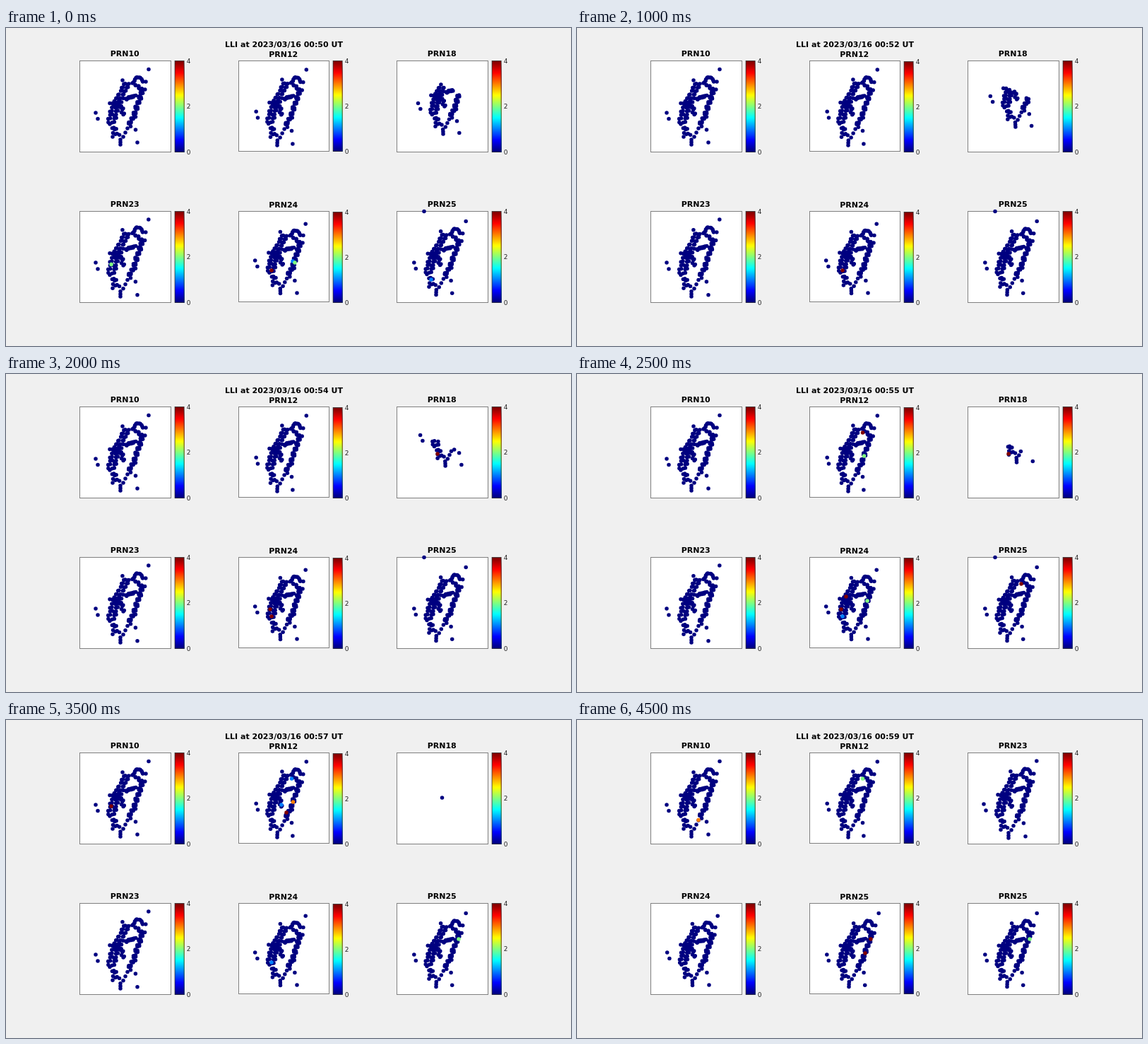
An HTML page for the animation above (5 s loop, 800 px wide and 450 px high).

```html
<!DOCTYPE html>
<html lang="en">
<head>
<meta charset="utf-8">
<title>LLI maps</title>
<style>
  html, body { margin: 0; width: 100%; height: 100%; overflow: hidden; background: #f0f0f0; }
  svg { display: block; width: 800px; height: 450px; }
  text { font-family: "DejaVu Sans", sans-serif; }
  .head { font-size: 11px; font-weight: bold; text-anchor: middle; }
  .tick { font-size: 9px; fill: #262626; }
  .box { fill: #fff; stroke: #808080; }
  .frame { fill: none; stroke: #333; stroke-width: .8; }
</style>
</head>
<body>
<svg id="stage" viewBox="0 0 800 450"></svg>
<script>
const STEP = 500, COUNT = 10, SHADES = 64;
const stage = document.getElementById('stage');

// Jet colour scale, 0 to 1.
function jet(value) {
  const channel = peak => 255 * Math.max(0, Math.min(1, 1.5 - Math.abs(4 * value - peak)));
  return `rgb(${[3, 2, 1].map(channel).map(Math.round)})`;
}

// Stations spaced along a polyline, scattered evenly across its width.
function band(count, width, ...line) {
  const last = line.length - 1;
  const scatter = [i => (i * .618 % 1 - .5) * width, i => (i * .755 % 1 - .5) * width / 2];
  return Array.from({ length: count }, (_, i) => {
    const at = i / (count - 1) * last, k = Math.min(last - 1, Math.floor(at));
    return scatter.map((shift, d) =>
      line[k][d] + (line[k + 1][d] - line[k][d]) * (at - k) + shift(i));
  });
}

const northEast = [98, 12.5], west = [23, 74], south = [58, 118];
const stations = [
  northEast, west, [26, 82.5], [94, 30], [79.5, 98], [82, 116], [47, 108],
  ...band(11, 1, [77, 31], [80, 24], [86, 24], [90, 30]),
  ...band(9, 4, [77, 33], [91, 42]),
  ...band(34, 12, [67, 31], [62, 44], [53, 58], [51, 63]),
  ...band(12, 6, [65, 55], [78, 50]),
  ...band(20, 14, [50, 64], [46, 88]),
  ...band(9, 8, [47, 92], [53, 107]),
  ...band(8, 5, [58, 62], [63, 77]),
  ...band(30, 6, [89, 42], [84, 58], [78, 76], [70, 92]),
  ...band(3, 0, [68, 96], [62, 108]),
  ...band(3, 0, [58, 112], [58, 119])
];

// Affine map that carries the three outer stations to the given points.
function project(points, [a, b, c]) {
  const ux = northEast[0] - west[0], uy = northEast[1] - west[1];
  const vx = south[0] - west[0], vy = south[1] - west[1];
  const det = ux * vy - uy * vx;
  return points.map(([x, y]) => {
    const dx = x - west[0], dy = y - west[1];
    const s = (dx * vy - dy * vx) / det, t = (dy * ux - dx * uy) / det;
    return [0, 1].map(d => b[d] + (a[d] - b[d]) * s + (c[d] - b[d]) * t);
  });
}

// Where each satellite sees the north-east, west and south stations.
const views = {
  PRN10: [[97.5, 12], [22.5, 73.5], [57.5, 117.5]],
  PRN12: [[95.8, 12.5], [24.7, 71.8], [54.5, 118.5]],
  PRN23: [[97.3, 11.5], [22.5, 72.5], [57.5, 119.5]],
  PRN24: [[94.7, 17.7], [23.2, 69.5], [59, 115]],
  PRN25: [[97.7, 14], [24.3, 72.5], [55.5, 117]]
};
const early = ['PRN10', 'PRN12', 'PRN18', 'PRN23', 'PRN24', 'PRN25'];
const late = ['PRN10', 'PRN12', 'PRN23', 'PRN24', 'PRN25', 'PRN25'];

// Slipping stations: position and level in each minute.
const slips = [
  [149, 122, '.......4'], [172, 141.5, '........23'],
  [406.5, 116, '.2...2.3'], [404.5, 83, '.....4.132'],
  [390, 120, '.......1'], [397, 131, '.......42'],
  [605, 106, '.1'], [611, 113, '...444'],
  [149, 334.5, '21'], [181, 330, '........1'],
  [406, 330, '1'], [409, 332, '2'], [411, 321, '...1.2'],
  [376, 343, '44444111'], [374, 333, '...444'], [381, 315, '.....4'],
  [416, 310, '........44'], [408, 330, '.........4'],
  [602, 356, '1'], [621, 294, '.1'], [607, 312, '...1'],
  [629, 297, '.....4'], [641, 310, '.......222']
];

const dot = ([x, y], level = 0) =>
  `<circle cx="${x.toFixed(1)}" cy="${y.toFixed(1)}" r="2.75" fill="${jet(level / 4)}"/>`;
const label = (kind, x, y, words) => `<text class="${kind}" x="${x}" y="${y}">${words}</text>`;
const rect = (x, y, w, h, look) =>
  `<rect x="${x}" y="${y}" width="${w}" height="${h}" ${look}/>`;

// The setting satellite loses stations from the north-east on.
function setting(minute) {
  if (minute > 6) return [[64, 63.6]];
  const x = 65.5 + 1.05 * minute - .07 * minute ** 2, y = 102.5 - 5 * minute;
  const visible = stations.filter(([a, b]) => b - .4 * a > 19.6 + 10.7 * minute);
  return project(visible, [[x + 33, y - 95], [x - 35.5, y - 42.5], [x, y]]);
}

function colorBar(x, y, height) {
  let parts = '';
  for (let i = 0; i < SHADES; i++) {
    const top = i / SHADES * height;
    parts += rect(x, y + top, 13, height - top, `fill="${jet(1 - i / (SHADES - 1))}"`);
  }
  return parts + rect(x, y, 13, height, 'class="frame"')
    + [4, 2, 0].map((n, i) => label('tick', x + 16.6, y + 3 + i * height / 2, n)).join('');
}

function panel(name, index, minute) {
  const column = index % 3, middle = column === 1, lower = index > 2;
  const left = [104.5, 329.5, 553.5][column], top = lower ? 259.5 : 46.5;
  const size = middle ? 128 : 129;
  const drop = middle && minute < 8 && (lower || minute > 1) ? 1 : 0;
  const points = views[name] ? project(stations, views[name]) : setting(minute);
  if (index === 5 && minute < 7) points.push([38.5, 0]);
  return `<g transform="translate(${left} ${top})">`
    + rect(0, 0, size, size, 'class="box"')
    + colorBar(size + 5.6, drop, size)
    + label('head', size / 2 - .8, middle ? -5.5 : -6.5, name)
    + points.map(p => dot(p)).join('') + '</g>';
}

function render(minute) {
  const names = minute < 8 ? early : late;
  stage.innerHTML = label('head', 393.5, 27, `LLI at 2023/03/16 00:5${minute} UT`)
    + names.map((name, i) => panel(name, i, minute)).join('')
    + slips.filter(slip => slip[2][minute] > 0).map(slip => dot(slip, slip[2][minute])).join('');
}

const start = performance.now();
let shown = -1;
function tick() {
  const minute = Math.floor((performance.now() - start) / STEP) % COUNT;
  if (minute !== shown) render(shown = minute);
  requestAnimationFrame(tick);
}
tick();
</script>
</body>
</html>
```
